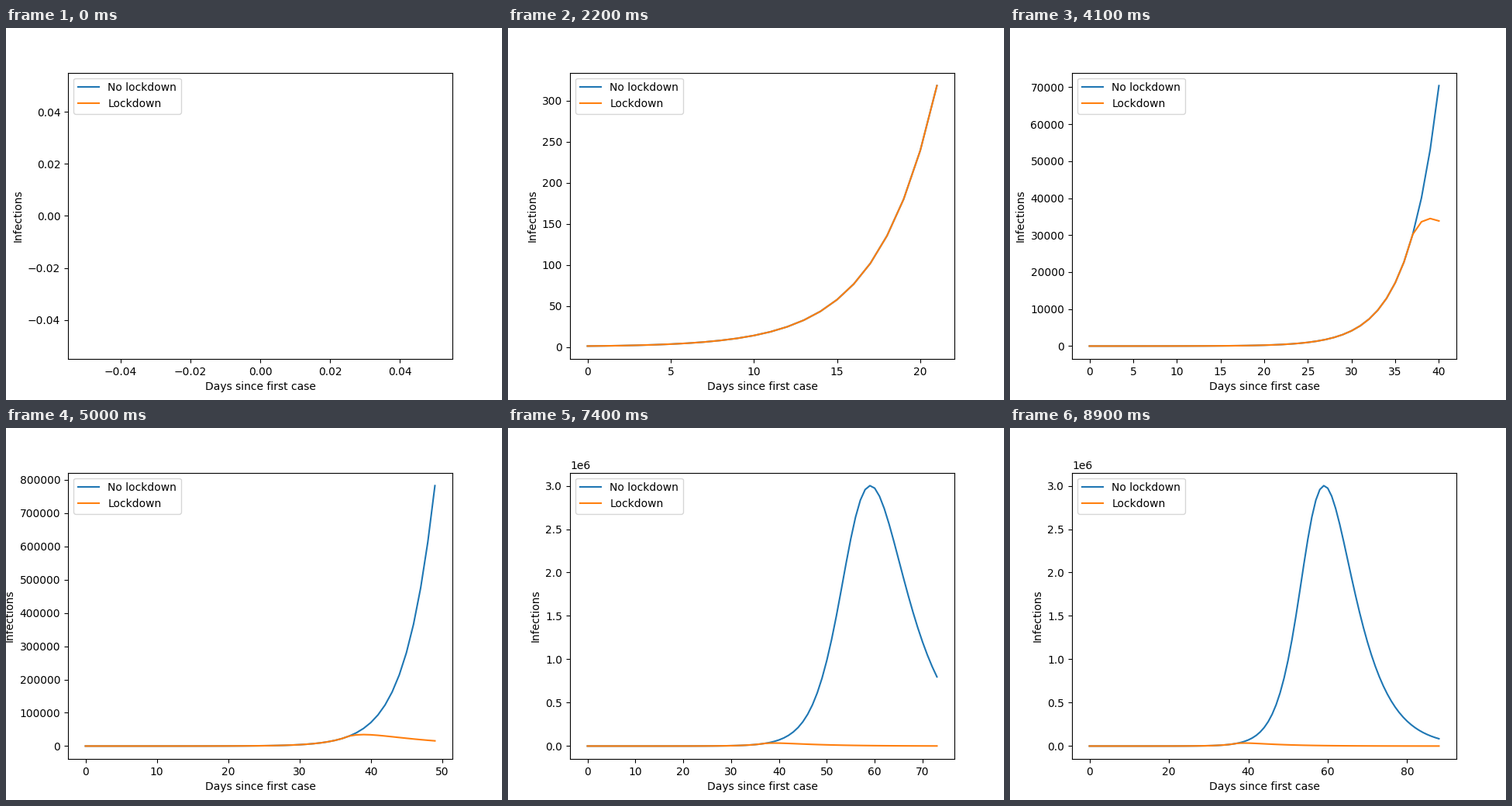
Write a matplotlib script that moves like this. It is 640 px wide and 480 px high and loops after 9000 ms.

```python
import matplotlib.pyplot as plt
import numpy as np
from matplotlib.animation import FuncAnimation

FRAMES = 90
INTERVAL = 100

POPULATION = 8.45e6
ONSET = 0.3             # exposed -> infectious, per day
RECOVERY = 0.15         # infectious -> recovered, per day
CONTACT = 0.58555       # transmissions per infectious person and day
EARLY_WEIGHT = 0.45     # relative infectivity while exposed
LOCKDOWN_DAY = 36
LOCKDOWN_FACTOR = 0.05


def simulate(lockdown):
    """Return the number of infected people for each day."""
    exposed, infectious, isolated = 1.2285, 0.844, 0.21
    susceptible = POPULATION
    infected = []
    for day in range(FRAMES):
        infected.append(infectious + isolated)
        rate = CONTACT
        if lockdown and day >= LOCKDOWN_DAY:
            rate *= LOCKDOWN_FACTOR
        source = infectious + EARLY_WEIGHT * exposed
        new = rate * source * susceptible / POPULATION
        onset = ONSET * exposed
        susceptible -= new
        exposed += new - onset
        infectious += onset - RECOVERY * infectious
        isolated *= 1 - RECOVERY
    return np.array(infected)


days = np.arange(FRAMES)
curves = {"No lockdown": simulate(False), "Lockdown": simulate(True)}

fig, ax = plt.subplots(figsize=(6.4, 4.8), dpi=100)


def draw(count):
    ax.clear()
    for label, values in curves.items():
        ax.plot(days[:count], values[:count], label=label)
    ax.set_xlabel("Days since first case")
    ax.set_ylabel("Infections")
    ax.legend(loc="upper left")
    return ax.lines


anim = FuncAnimation(fig, draw, frames=FRAMES, interval=INTERVAL,
                     init_func=lambda: draw(0), repeat=True, repeat_delay=0)
plt.show()
```
